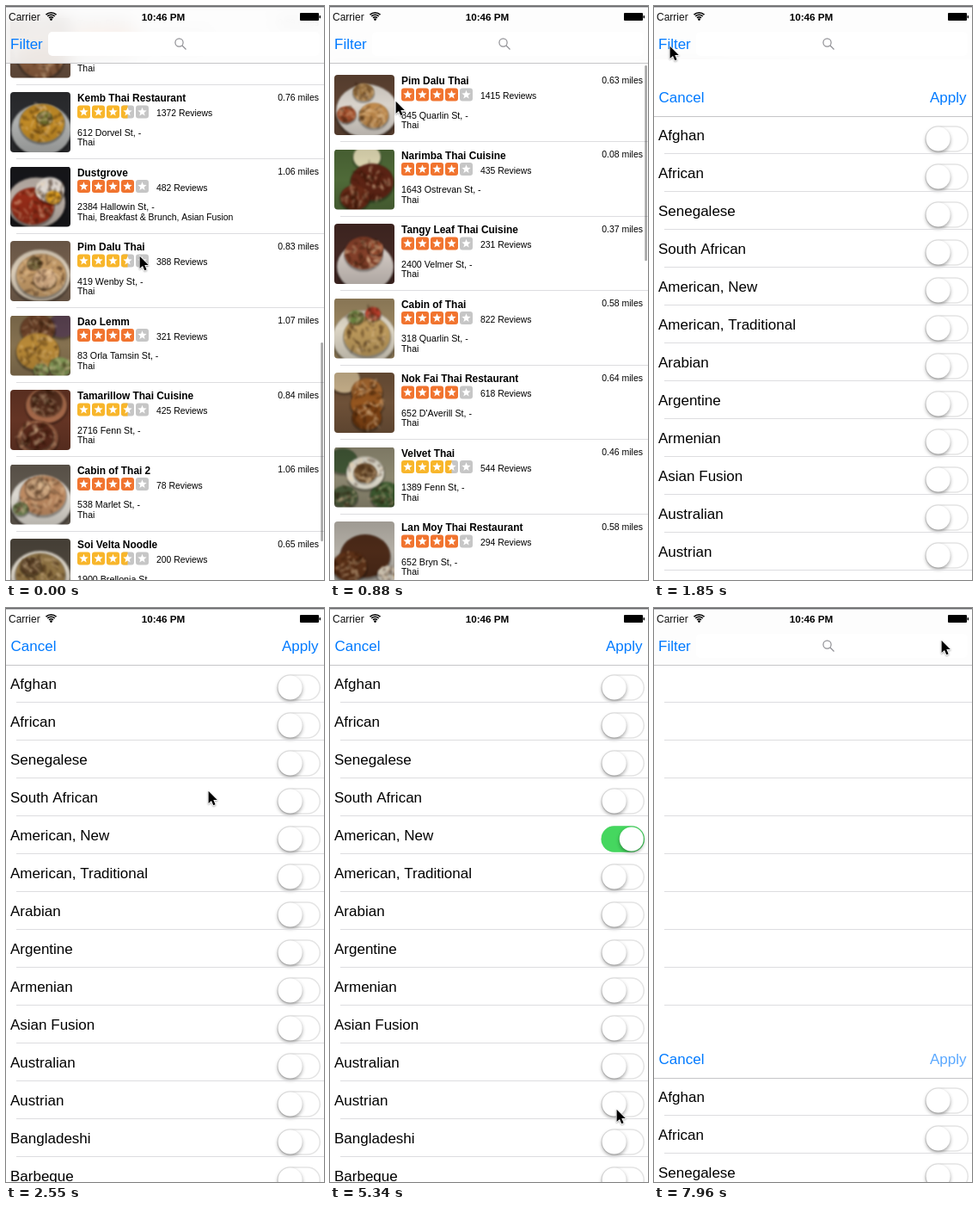
Recreate the animation shown at these times as an HTML page with a canvas. Size 370x667 px, loop 8000 ms.

```html
<!DOCTYPE html>
<html lang="en">
<head>
<meta charset="utf-8">
<title>Restaurant list and filter</title>
<style>
html, body { margin: 0; width: 100%; height: 100%; overflow: hidden; background: #fff; }
canvas { display: block; width: 370px; height: 667px; }
</style>
</head>
<body>
<canvas id="stage"></canvas>
<script>
const W = 370, H = 667, LOOP = 8000, TICK = 87.36;
const ROW = 86.5, TOP = 67, CELL = 44;
const BLUE = '#007aff', FONT = '"Liberation Sans", Arial, sans-serif';

const canvas = document.getElementById('stage');
const ratio = window.devicePixelRatio || 1;
canvas.width = W * ratio;
canvas.height = H * ratio;
const ctx = canvas.getContext('2d');

// name | address | reviews | miles | rating | cuisine
const places = `Pim Dalu Thai|845 Quarlin St|1415|0.63|4
Narimba Thai Cuisine|1643 Ostrevan St|435|0.08|4
Tangy Leaf Thai Cuisine|2400 Velmer St|231|0.37|4
Cabin of Thai|318 Quarlin St|822|0.58|4
Nok Fai Thai Restaurant|652 D'Averill St|618|0.64|4
Velvet Thai|1389 Fenn St|544|0.46|3.5
Lan Moy Thai Restaurant|652 Bryn St|294|0.58|4
Bua Trell Thai|927 Calder Row|310|0.71|4
Wild Ginger Porch|1156 Fenn St|266|0.52|3.5
Torin Place|240 Marlet St|198|0.69|4
Kemb Thai Restaurant|612 Dorvel St|1372|0.76|3.5
Dustgrove|2384 Hallowin St|482|1.06|4|Thai, Breakfast & Brunch, Asian Fusion
Pim Dalu Thai|419 Wenby St|388|0.83|3.5
Dao Lemm|83 Orla Tamsin St|321|1.07|4
Tamarillow Thai Cuisine|2716 Fenn St|425|0.84|3.5
Cabin of Thai 2|538 Marlet St|78|1.06|4
Soi Velta Noodle|1900 Brellonia St|200|0.65|3.5
Paper Lotus Thai|74 Wenby St|156|0.92|4`.split('\n').map(line => {
  const [name, address, reviews, miles, rating, food = 'Thai'] = line.split('|');
  return { name, address, reviews, miles, rating: +rating, food };
});

// background, then discs: colour x y radius
const dishes = [
  '#5f4433,#d9d3cb 38 42 36,#a8522f 14 46 11,#c08a4c 46 47 17,#a47a45 34 20 12',
  '#4f6a38,#e6dfb8 38 9 16,#5d2415 44 38 25,#6c2c18 24 56 17',
  '#432823,#cfc6c0 36 50 33,#83402a 34 34 22,#9c4f33 48 28 9',
  '#9a8560,#dcd5c5 35 46 37,#bd9a5c 38 44 27,#c5432f 45 18 9,#6b8440 25 22 9',
  '#6e5138,#c9b28c 12 8 18,#a5672f 38 22 18,#94551f 38 36 19,#7f4314 38 52 17',
  '#8d8871,#405635 10 16 17,#3f5d32 60 56 18,#4a5a3a 12 58 15,#dcd8ca 36 30 22,#6b4c2b 36 30 13',
  '#b5b0a7,#4c2a18 36 40 29,#5f3319 18 52 20,#d8d3c8 62 62 12',
  '#7b4a2f,#e5ded2 35 38 29,#b87433 36 38 19',
  '#3c4038,#d3c9b7 36 38 30,#93652f 35 36 20',
  '#69503f,#d8c5b8 35 37 31,#8b5e3f 36 48 26',
  '#2c2d30,#aeb0af 36 44 35,#c08a26 37 36 26,#6d6d2c 40 30 9',
  '#17171b,#b9aea6 30 42 34,#962c18 26 46 25,#e6dfd8 46 27 17,#e3a423 50 36 9',
  '#75604e,#d8cab6 35 40 35,#c39a68 36 40 29,#d2ab83 40 44 13,#77693e 28 26 8',
  '#857150,#5b4352 60 12 16,#6f452b 32 16 20,#b98a38 32 42 25,#8aa05c 58 60 13,#90a560 36 64 9',
  '#643424,#a5694a 42 18 24,#57301f 42 14 18,#8f5a40 32 56 24,#5b2a1b 32 54 18',
  '#625a50,#dcd8d0 36 44 36,#bc8a62 38 36 27,#c9a27c 32 28 14,#6d8050 12 52 9',
  '#4d463c,#d6cfc2 35 44 35,#8f7344 35 42 29,#5d452a 24 32 12',
  '#5b4636,#e2d9cb 35 38 30,#b9713a 35 38 20'
].map((spec, i) => paintDish(spec.split(','), i + 3));

const cuisines = ['Afghan', 'African', 'Senegalese', 'South African', 'American, New',
  'American, Traditional', 'Arabian', 'Argentine', 'Armenian', 'Asian Fusion',
  'Australian', 'Austrian', 'Bangladeshi', 'Barbeque'];
const switchTimes = { 4: 4150, 12: 5985 };

// pointer path: tick, x, y
const path = [
  [0, 155, 290], [1, 164, 386], [2, 178, 520], [3, 205, 556], [5, 209, 553],
  [6, 200, 500], [8, 130, 240], [10, 76, 110], [13, 36, 20], [16, 18, 46],
  [22, 18, 46], [25, 150, 180], [27, 224, 224], [28, 224, 224], [29, 235, 212],
  [31, 290, 264], [32, 304, 276], [34, 304, 276], [39, 325, 276], [41, 325, 276],
  [42, 325, 274], [51, 325, 274], [57, 336, 564], [59, 334, 560], [60, 334, 560],
  [61, 333, 582], [63, 327, 612], [64, 327, 613], [66, 326, 622], [71, 326, 622],
  [78, 300, 136], [83, 301, 7], [88, 334, 37], [92, 334, 37]
];

const clamp = v => Math.max(0, Math.min(1, v));
const smooth = v => { v = clamp(v); return v * v * (3 - 2 * v); };

// critically damped: 1 at the start, 0 at rest
function settle(ms) {
  const k = Math.max(0, ms) * 0.01826;
  return (1 + k) * Math.exp(-k);
}

function random(seed) {
  return () => (seed = (seed * 16807) % 2147483647) / 2147483647;
}

function paintDish([back, ...discs], seed) {
  const c = document.createElement('canvas');
  c.width = c.height = 70 * ratio;
  const g = c.getContext('2d'), rnd = random(seed * 7919);
  const disc = (x, y, rx, ry, fill, turn = 0) => {
    g.fillStyle = fill;
    g.beginPath();
    g.ellipse(x, y, rx, ry, turn, 0, 7);
    g.fill();
  };
  g.scale(ratio, ratio);
  g.fillStyle = back;
  g.fillRect(0, 0, 70, 70);
  g.filter = `blur(${0.8 * ratio}px)`;
  discs.forEach((d, n) => {
    const [fill, x, y, r] = d.split(' ');
    disc(+x, +y + 2, +r + 1, r * 0.9, 'rgba(0,0,0,.3)');
    disc(+x, +y, +r, r * 0.86, fill);
    for (let i = 0; n && i < r * 2; i++) {
      const a = rnd() * 6.3, q = Math.sqrt(rnd()) * r * 0.95;
      disc(+x + Math.cos(a) * q, +y + Math.sin(a) * q * 0.86, 1 + rnd() * 5, 0.8 + rnd() * 1.6,
        rnd() < 0.5 ? 'rgba(255,225,180,.26)' : 'rgba(40,15,0,.3)', rnd() * 3);
    }
  });
  g.filter = 'none';
  const shade = g.createLinearGradient(0, 0, 0, 70);
  shade.addColorStop(0, 'rgba(0,0,0,.12)');
  shade.addColorStop(0.5, 'rgba(0,0,0,0)');
  shade.addColorStop(1, 'rgba(0,0,0,.16)');
  g.fillStyle = shade;
  g.fillRect(0, 0, 70, 70);
  return c;
}

// y is the middle of the capitals
function text(str, x, y, size, { color = '#000', bold = false, align = 'left' } = {}) {
  ctx.font = `${bold ? 'bold ' : ''}${size}px ${FONT}`;
  ctx.textAlign = align;
  ctx.fillStyle = color;
  ctx.fillText(str, x, y + size * 0.36);
}

function box(x, y, w, h, r, fill) {
  ctx.fillStyle = fill;
  ctx.beginPath();
  ctx.roundRect(x, y, w, h, r);
  ctx.fill();
}

function line(x, y, color = '#dddde0') {
  ctx.fillStyle = color;
  ctx.fillRect(x, y, W - x, 1);
}

function star(x, y) {
  ctx.fillStyle = '#fff';
  ctx.beginPath();
  for (let i = 0; i < 10; i++) {
    const a = i * Math.PI / 5 - Math.PI / 2, r = i % 2 ? 2.3 : 5.4;
    ctx.lineTo(x + Math.cos(a) * r, y + Math.sin(a) * r);
  }
  ctx.fill();
}

function stars(x, y, rating) {
  const color = rating < 4 ? '#f8b62b' : '#f1742f';
  for (let i = 0; i < 5; i++) {
    const left = x + i * 17;
    box(left, y, 15, 15, 3, i + 1 <= rating ? color : '#c6c6c6');
    if (rating > i && rating < i + 1) box(left, y, 7.5, 15, [3, 0, 0, 3], color);
    star(left + 7.5, y + 7.7);
  }
}

function photo(img, x, y) {
  ctx.save();
  ctx.beginPath();
  ctx.roundRect(x, y, 70, 70, 4);
  ctx.clip();
  ctx.drawImage(img, x, y, 70, 70);
  ctx.restore();
}

function placeRow(p, img, y) {
  photo(img, 5, y + 9);
  text(p.name, 83, y + 16, 11.9, { bold: true });
  text(p.miles + ' miles', 364, y + 15, 10.5, { align: 'right' });
  stars(83, y + 24.5, p.rating);
  text(p.reviews + ' Reviews', 175, y + 33.5, 10.4);
  text(p.address + ', -', 83, y + 56, 10.7);
  text(p.food, 83, y + 67.5, 10.4);
  line(12, Math.round(y + 86));
}

function scrollAt(t) {
  const hit = 430.6;
  if (t < hit) return 841 * (1 - Math.pow(t / hit, 1.35));
  const s = (t - hit) / 1000;
  return -2630 * s * Math.exp(-12.8 * s);
}

function placeList(t) {
  const scroll = scrollAt(t);
  places.forEach((p, i) => {
    const y = TOP + i * ROW - scroll;
    if (y > -ROW && y < H) placeRow(p, dishes[i], y);
  });
  const view = H - TOP, total = places.length * ROW;
  const size = view * view / total + Math.min(0, scroll);
  const top = 69 + Math.max(0, scroll) * (view - 4) / total;
  box(366.3, top, 2.6, size, 1.3, `rgba(0,0,0,${0.36 * (1 - clamp((t - 1050) / 300))})`);
}

// frosted glass: whatever lies under the bar is blurred and bleached
function frost(height) {
  const reach = height + 24;
  ctx.save();
  ctx.beginPath();
  ctx.rect(0, 0, W, height);
  ctx.clip();
  ctx.filter = `blur(${10 * ratio}px)`;
  ctx.drawImage(canvas, 0, 0, W * ratio, reach * ratio, 0, 0, W, reach);
  ctx.filter = 'none';
  ctx.fillStyle = 'rgba(253,253,253,.86)';
  ctx.fillRect(0, 0, W, height);
  ctx.restore();
}

function searchBar(t) {
  frost(66);
  box(49, 30, 316, 28, 5, '#fff');
  line(0, 66, '#c6c6c8');
  ctx.globalAlpha = t > 1560 && t < 1700 ? 0.4 : 1;
  text('Filter', 5, 44, 17, { color: BLUE });
  ctx.globalAlpha = 1;
  ctx.strokeStyle = '#8e8e93';
  ctx.lineWidth = 1.2;
  ctx.beginPath();
  ctx.arc(201.5, 42.5, 4.6, 0, 7);
  ctx.moveTo(205, 46);
  ctx.lineTo(209.5, 50.5);
  ctx.stroke();
}

function toggle(y, on) {
  box(315.5, y - 15.2, 50.5, 30.4, 15.2, '#e4e4e4');
  if (on < 1) box(317, y - 13.7, 47.5, 27.4, 13.7, '#fff');
  if (on > 0) {
    ctx.globalAlpha = on;
    box(315.5, y - 15.2, 50.5, 30.4, 15.2, '#45d75f');
    ctx.globalAlpha = 1;
  }
  ctx.save();
  ctx.shadowColor = 'rgba(0,0,0,.38)';
  ctx.shadowBlur = 4 * ratio;
  ctx.shadowOffsetY = 2 * ratio;
  ctx.fillStyle = '#fff';
  ctx.beginPath();
  ctx.arc(330.6 + 20.2 * on, y, 14, 0, 7);
  ctx.fill();
  ctx.restore();
}

function filterSheet(t, y) {
  ctx.save();
  ctx.translate(0, y);
  ctx.fillStyle = '#fff';
  ctx.fillRect(0, 0, W, H);
  text('Cancel', 5.5, 44, 17, { color: BLUE });
  ctx.globalAlpha = t > 7770 ? 0.65 : 1;
  text('Apply', 363.5, 44, 17, { color: BLUE, align: 'right' });
  ctx.globalAlpha = 1;
  line(0, 66, '#c6c6c8');
  cuisines.forEach((name, i) => {
    const top = TOP + i * CELL - 1;
    text(name, 5, top + 22, 17);
    toggle(top + 26.5, smooth((t - (switchTimes[i] || Infinity)) / 250));
    line(12, top + 43);
  });
  ctx.restore();
}

function statusBar() {
  ctx.fillStyle = '#66676b';
  ctx.fillRect(0, 0, W, 1.4);
  text('Carrier', 3, 12.5, 12, { color: '#111' });
  ctx.strokeStyle = '#000';
  ctx.lineWidth = 1.6;
  for (const r of [3.6, 6.2, 8.8]) {
    ctx.beginPath();
    ctx.arc(52.5, 16.5, r, -2.32, -0.82);
    ctx.stroke();
  }
  ctx.beginPath();
  ctx.arc(52.5, 15.6, 1.4, 0, 7);
  ctx.fillStyle = '#000';
  ctx.fill();
  text('10:46 PM', 183, 12.5, 11.7, { bold: true, align: 'center' });
  box(342, 8, 22, 9, 1, '#000');
  box(364.5, 11, 1.6, 3.4, 0.8, '#000');
}

function pointer(tick) {
  const n = Math.max(1, path.findIndex(p => p[0] >= tick));
  const [a, ax, ay] = path[n - 1], [b, bx, by] = path[n];
  const k = (tick - a) / (b - a);
  ctx.save();
  ctx.translate(ax + (bx - ax) * k, ay + (by - ay) * k);
  ctx.shadowColor = 'rgba(0,0,0,.35)';
  ctx.shadowBlur = 2 * ratio;
  ctx.shadowOffsetY = ratio;
  ctx.lineJoin = 'round';
  ctx.lineWidth = 1.6;
  ctx.strokeStyle = '#fff';
  ctx.fillStyle = '#000';
  ctx.beginPath();
  ctx.moveTo(0.6, 0.8);
  ctx.lineTo(0.6, 15);
  ctx.lineTo(4, 11.9);
  ctx.lineTo(6.3, 17.2);
  ctx.lineTo(8.6, 16.2);
  ctx.lineTo(6.3, 11.1);
  ctx.lineTo(10.8, 11);
  ctx.closePath();
  ctx.stroke();
  ctx.shadowColor = 'transparent';
  ctx.fill();
  ctx.restore();
}

function draw(ms) {
  // the screen refreshes in coarse ticks
  const tick = Math.floor((ms % LOOP) / TICK), t = tick * TICK;
  const closing = t > 7811;
  const sheet = closing ? H * (1 - settle(t - 7811)) : H * settle(t - 1616);
  ctx.setTransform(ratio, 0, 0, ratio, 0, 0);
  ctx.fillStyle = '#fff';
  ctx.fillRect(0, 0, W, H);
  if (closing) {
    for (let y = 109; y < H; y += CELL) line(12, y);
  } else if (t < 2600) {
    placeList(t);
  }
  searchBar(t);
  if (sheet < H) filterSheet(t, sheet < 0.5 ? 0 : Math.round(sheet));
  statusBar();
  pointer(tick);
}

let start;
function loop(now) {
  start ??= now;
  draw(now - start);
  requestAnimationFrame(loop);
}
draw(0);
requestAnimationFrame(loop);
</script>
</body>
</html>
```
